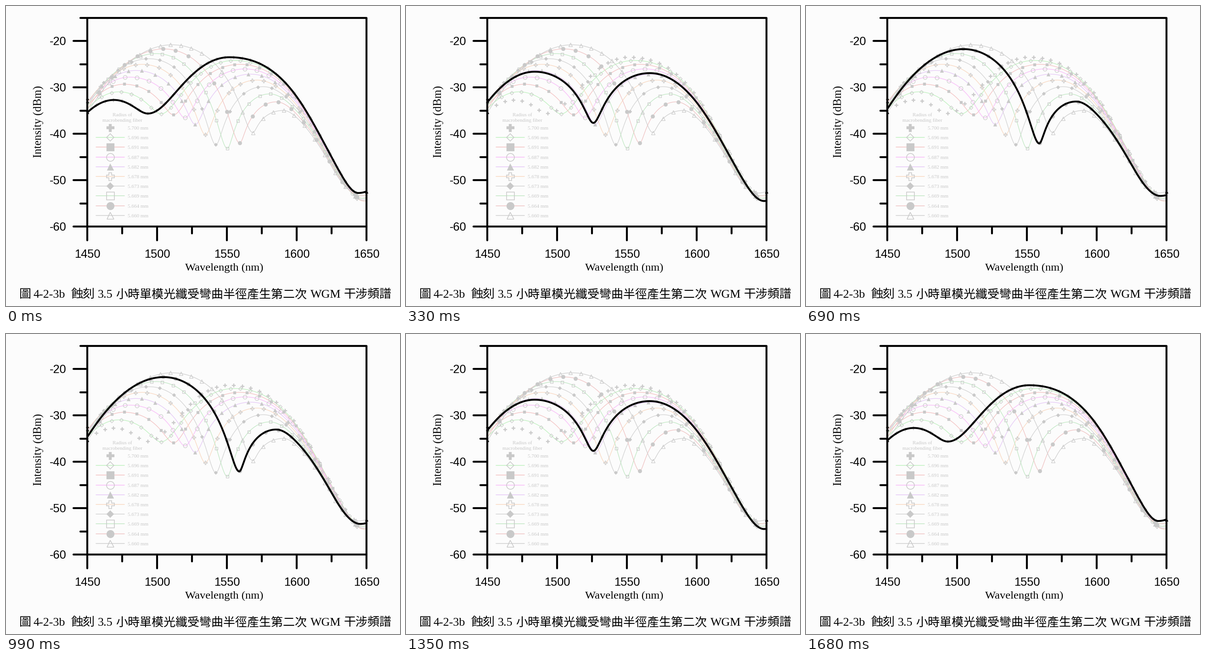
Animation, 858 px wide and 653 px high, one loop 1800 ms. Source, as a matplotlib script:

```python
import numpy as np
import matplotlib.pyplot as plt
from matplotlib.animation import FuncAnimation

W, H, DPI = 858, 653, 100
PT = 72 / DPI                      # points per pixel
BG, GREY = "#fcfcfc", "#c9c9c9"
LEFT, RIGHT, TOP, BOTTOM = 177, 785, 26, 480
LAST = 9                           # index of the last spectrum
STEPS = 26                         # steps from the first spectrum to the last

# line colour, marker, filled, marker spacing
STYLES = [
    (None, "P", True, 18.7),
    ("#bff1bf", "D", False, 21.6),
    ("#f4c2c2", "s", True, 26.7),
    ("#f9bcf9", "o", False, 26.1),
    ("#e6c9f7", "^", True, 29),
    ("#f9d9c2", "P", False, 25.4),
    ("#d4d4d4", "D", True, 30.5),
    ("#c2e8c5", "s", False, 23.6),
    ("#f0c4c4", "o", True, 27.9),
    ("#d0d0d0", "^", False, 22.4),
]
LEGEND_SIZE = {"P": 17, "D": 12, "s": 17, "o": 17, "^": 15}
CURVE_SIZE = {"P": 8.5, "D": 6, "s": 6.5, "o": 8.5, "^": 8}


def clamped_spline(x, y, q):
    """Cubic spline through (x, y), flat at both ends, evaluated at q."""
    h, n = np.diff(x), len(x)
    slope = np.concatenate([[0], np.diff(y) / h, [0]])
    a = np.diag(h, 1) + np.diag(h, -1)
    a += 2 * np.diag(np.append(h, 0) + np.append(0, h))
    m = np.linalg.solve(a, 6 * np.diff(slope))
    q = np.clip(q, x[0], x[-1])
    i = np.clip(np.searchsorted(x, q) - 1, 0, n - 2)
    s, r, hi = q - x[i], x[i + 1] - q, h[i]
    return ((m[i] * r**3 + m[i + 1] * s**3) / (6 * hi)
            + (y[i] / hi - m[i] * hi / 6) * r
            + (y[i + 1] / hi - m[i + 1] * hi / 6) * s)


def notch(u, eps):
    """Two-beam interference in dB, scaled to run from 0 (peak) to 1 (dip)."""
    fade = np.sin(np.pi / 2 * np.clip(u, 0, 1))**2
    return np.log(1 - (1 - eps) * fade) / np.log(eps)


def dip_x(k):
    return 309 + 25.4 * k + 5 * np.sin(2 * np.pi * k / LAST)


def curve(k, x):
    """Pixel height of spectrum k (may be fractional) at pixel x."""
    arch = np.sin(np.pi * k / LAST)
    start = 231 - 23 * arch
    x1, y1 = 235 + 10.2 * k + .43 * k**2, 204.5 - 18.2 * k + .54 * k**2
    xd, yd = dip_x(k), 234 + 76 * np.exp(-((k - 6.9) / 2.7)**2)
    x2, y2 = 486 + 10.7 * k + .27 * k**2, 111.5 + 6.3 * k + .73 * k**2
    xt, yt = 767 + 13 * arch, 407 + 18 * arch
    eps = .03 + .32 * np.exp(-k)

    fx = np.array([632, 665, 700, 730])
    lift = 46 * (k / LAST)**1.5 * np.exp((632 - fx) / 90)
    fy = np.array([196, 248, 312, 367]) + lift
    flank = clamped_spline(np.r_[x2, fx, xt], np.r_[y2, fy, yt], x)

    return np.select(
        [x < x1, x < xd, x < x2, x < xt],
        [y1 + (start - y1) * ((x - x1) / (LEFT + 1 - x1))**2,
         y1 + (yd - y1) * notch((x - x1) / (xd - x1), eps),
         y2 + (yd - y2) * notch((x - x2) / (xd - x2), eps),
         flank],
        yt - .0104 * (x - xt)**2)


fig = plt.figure(figsize=(W / DPI, H / DPI), dpi=DPI, facecolor=BG)
ax = fig.add_axes([0, 0, 1, 1])
ax.set_xlim(0, W)
ax.set_ylim(H, 0)
ax.axis("off")


def stroke(x, y, color="black", width=4.2, z=5):
    return ax.plot(x, y, color=color, lw=width * PT, zorder=z,
                   solid_capstyle="round", solid_joinstyle="round")[0]


def marks(x, y, shape, filled, size, z=2, color=GREY, edge=1.1):
    ax.plot(x, y, ls="none", marker=shape, ms=size * PT, mec=color,
            mfc=color if filled else "none",
            mew=(.3 if filled else edge) * PT, zorder=z)


def label(x, y, text, size, font="Liberation Serif", ha="left",
          color="black", **kw):
    ax.text(x, y, text, fontsize=size * PT, family=font, ha=ha,
            va="baseline", color=color, zorder=6, **kw)


def draw_frame():
    stroke([LEFT, RIGHT, RIGHT, LEFT, LEFT],
           [TOP, TOP, BOTTOM, BOTTOM, TOP])
    for i in range(10):
        y = TOP + i * (BOTTOM - TOP) / 9
        stroke([147 if i % 2 else 162, LEFT], [y, y])
        if i % 2:
            label(132, y + 9, f"-{15 + 5 * i}", 25.4, "Liberation Sans", "right")
    for i in range(9):
        x = LEFT + i * (RIGHT - LEFT) / 8
        stroke([x, x], [BOTTOM, 495 if i % 2 else 510])
        if i % 2 == 0:
            label(x + .5, 548, str(1450 + 25 * i), 25.4, "Liberation Sans", "center")
    label(475, 576, "Wavelength (nm)", 24.5, ha="center")
    label(78, 252, "Intensity (dBm)", 24.6, ha="center",
          rotation=90, rotation_mode="anchor")
    # marker ends that poke out of the side axes
    marks([177, 177], [203, 210], "D", True, 4.5, 6, "black")
    marks([178], [232], "^", True, 5, 6, "black")
    marks([785], [404], "^", True, 7, 6, "black")


def draw_spectra():
    x = np.linspace(LEFT, RIGHT, 600)
    for k, (color, shape, filled, gap) in enumerate(STYLES):
        if color:
            stroke(x, curve(k, x), color, 1.3, 1)
        # one marker always sits in the dip
        first = 192 + (dip_x(k) - 192) % gap
        mx = np.arange(first, 766, gap)
        marks(mx, curve(k, mx), shape, filled, CURVE_SIZE[shape])


def draw_legend():
    label(253, 239.5, "Radius of", 11, ha="center", color=GREY)
    label(253, 251.5, "macrobending fiber", 11, ha="center", color=GREY)
    for k, (color, shape, filled, _) in enumerate(STYLES):
        y = 265 + 21.2 * k
        if color:
            stroke([196, 258], [y, y], color, 1.5, 1)
        marks([227], [y], shape, filled, LEGEND_SIZE[shape], edge=1.5)
        label(265, y + 4, f"{5.7 - .04 * k / LAST:.3f} mm", 11.1, color=GREY)


def draw_caption():
    han = "Noto Sans CJK JP"
    for x, text, font in [
        (28.5, "圖", han), (59.5, "4-2-3b", None), (142, "蝕刻", han),
        (199.5, "3.5", None), (239, "小時單模光纖受彎曲半徑產生第二次", han),
        (663, "WGM", None), (736, "干涉頻譜", han),
    ]:
        label(x, 635, text, 26, font or "Liberation Serif",
              weight="light" if font else "normal")


draw_frame()
draw_spectra()
draw_legend()
draw_caption()

xs = np.linspace(LEFT + 1, RIGHT - 1, 700)
sweep = stroke(xs, curve(0, xs), width=4, z=4)


def update(frame):
    # forward, short rest, back, short rest
    step = np.clip(min(frame, 2 * STEPS + 4 - frame), 0, STEPS)
    sweep.set_ydata(curve(step * LAST / STEPS, xs))
    return (sweep,)


anim = FuncAnimation(fig, update, frames=60, interval=30, repeat=True,
                     repeat_delay=0)
plt.show()
```
